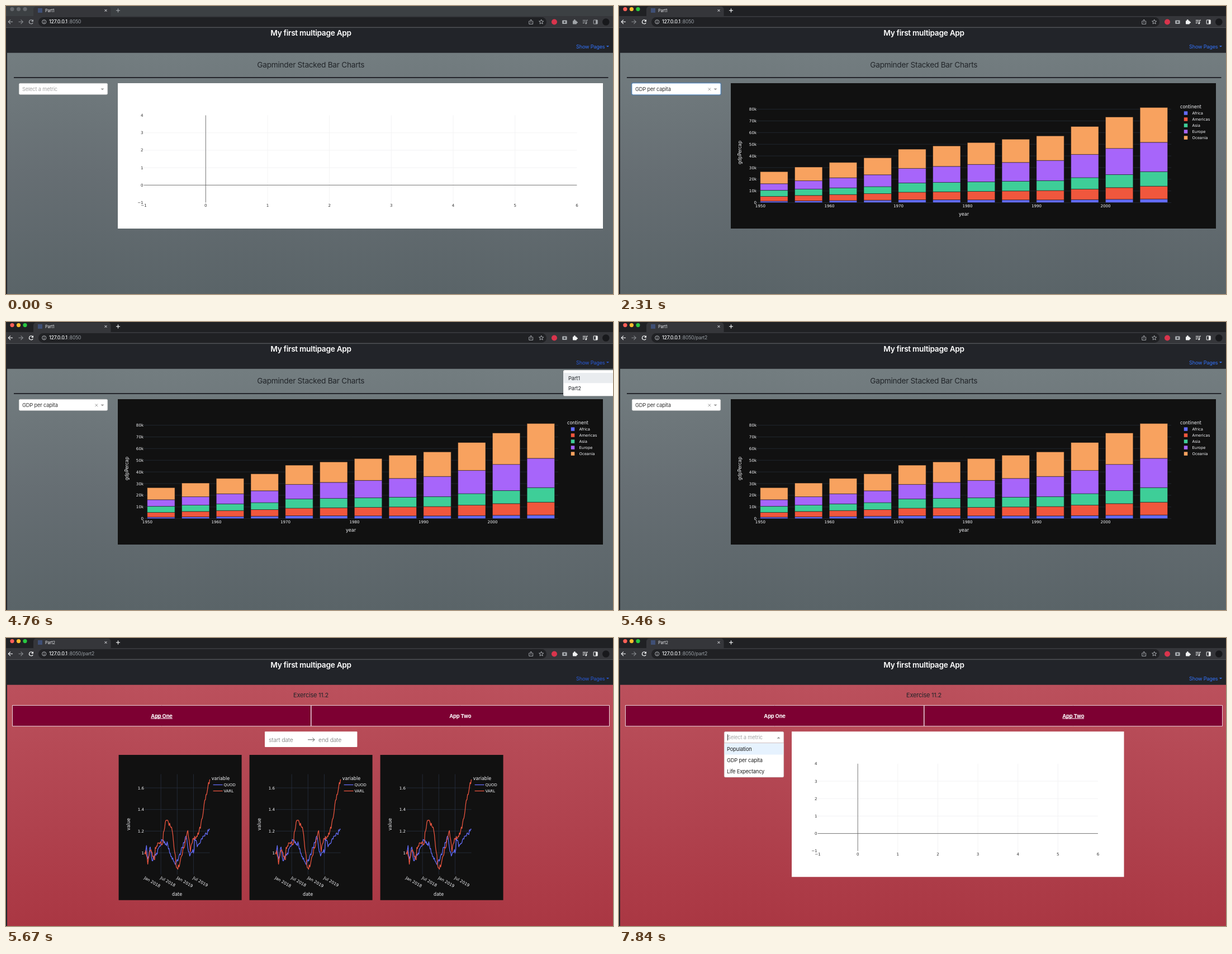
Recreate the animation shown at these times as an HTML page with a canvas. Size 1086 by 515 pixels, loop 8 s.

```html
<!DOCTYPE html>
<html lang="en">
<head>
<meta charset="utf-8">
<title>My first multipage App</title>
<style>
html, body { margin: 0; width: 100%; height: 100%; overflow: hidden; background: #222429; }
canvas { display: block; width: 1086px; height: 515px; }
</style>
</head>
<body>
<canvas id="stage"></canvas>
<script>
const W = 1086, H = 515, LOOP = 8000;
const canvas = document.getElementById('stage');
const ctx = canvas.getContext('2d');
const dpr = window.devicePixelRatio || 1;
canvas.width = W * dpr;
canvas.height = H * dpr;

const UI = 'Inter, "Liberation Sans", sans-serif';
const PLOT = '"DejaVu Sans", sans-serif';
const DARK = '#222429', INK = '#212529', PALE = '#f8f9fc';

const clamp = v => Math.max(0, Math.min(1, v));
const ramp = (t, from, to) => clamp((t - from) / (to - from));
const within = (t, a, b) => t >= a && t < b;

// Straight lines between key points
function interp(xs, ys, x) {
  let i = 1;
  while (i < xs.length - 1 && xs[i] < x) i++;
  return ys[i - 1] + (ys[i] - ys[i - 1]) * ramp(x, xs[i - 1], xs[i]);
}

function seeded(seed) {
  return () => (seed = seed * 16807 % 2147483647) / 2147483647;
}

// Weekly values: key points with a little noise between them
function walk(name, color, seed, weeks, levels) {
  const rand = seeded(seed);
  const values = Array.from({ length: 105 }, (_, k) =>
    interp(weeks, levels, k) + (weeks.includes(k) ? 0 : (rand() - 0.5) * 0.045));
  return { name, color, values };
}

const stocks = [
  walk('QUOD', '#636cf9', 77,
    [0, 3, 5, 9, 12, 18, 28, 37, 42, 50, 58, 66, 72, 79, 80, 84, 95, 104],
    [1, 1.067, 0.942, 1.053, 0.926, 0.975, 1.12, 1.075, 0.965, 0.905, 1.01, 1.154, 0.97, 1.025, 1.134, 1.055, 1.156, 1.217]),
  walk('VARL', '#ee5640', 41,
    [0, 2, 5, 9, 16, 17, 22, 29, 30, 34, 38, 43, 46, 51, 53, 60, 69, 73, 77, 86, 93, 96, 104],
    [1, 1.02, 0.894, 1.02, 0.935, 1.05, 1.09, 1.09, 1.19, 1.3, 1.28, 1.237, 1.106, 0.861, 0.847, 0.98, 1.205, 1.01, 1.13, 1.17, 1.35, 1.487, 1.678])
];

// Mean GDP per capita at key five-year steps from 1952
const gdpSteps = [0, 3, 4, 8, 11];
const gdp = [
  ['Africa', '#636cf9', [1253, 2050, 2450, 2282, 3089]],
  ['Americas', '#f0573d', [4079, 5668, 6491, 8045, 11003]],
  ['Asia', '#3ece98', [5195, 5971, 7900, 8500, 12473]],
  ['Europe', '#a765fa', [5661, 10144, 12480, 17300, 25054]],
  ['Oceania', '#f8a25f', [10298, 14495, 16418, 21000, 29810]]
];

function rect(x, y, w, h, fill, stroke, r = 0, lw = 1) {
  ctx.beginPath();
  ctx.roundRect(x, y, w, h, r);
  if (fill) { ctx.fillStyle = fill; ctx.fill(); }
  if (stroke) { ctx.strokeStyle = stroke; ctx.lineWidth = lw; ctx.stroke(); }
}

function disc(x, y, r, fill) {
  ctx.beginPath();
  ctx.arc(x, y, r, 0, 7);
  ctx.fillStyle = fill;
  ctx.fill();
}

function line(points, color, lw = 1) {
  ctx.beginPath();
  for (let i = 0; i < points.length; i += 2) ctx.lineTo(points[i], points[i + 1]);
  ctx.strokeStyle = color;
  ctx.lineWidth = lw;
  ctx.stroke();
}

function ring(x, y, r, color, lw = 1, from = 0, to = 7) {
  ctx.beginPath();
  ctx.arc(x, y, r, from, to);
  ctx.strokeStyle = color;
  ctx.lineWidth = lw;
  ctx.stroke();
}

function cross(x, y, r, color) {
  line([x - r, y - r, x + r, y + r], color);
  line([x - r, y + r, x + r, y - r], color);
}

function plus(x, y, r, color, lw) {
  line([x - r, y, x + r, y], color, lw);
  line([x, y - r, x, y + r], color, lw);
}

function tri(x, y, w, h, fill) {
  ctx.beginPath();
  ctx.moveTo(x - w / 2, y - h / 2);
  ctx.lineTo(x + w / 2, y - h / 2);
  ctx.lineTo(x, y + h / 2);
  ctx.fillStyle = fill;
  ctx.fill();
}

// y is the middle of the capitals
function text(s, x, y, size, color, align = 'left', weight = 400) {
  ctx.font = `${weight} ${size}px ${UI}`;
  ctx.letterSpacing = -0.02 * size + 'px';
  ctx.textAlign = align;
  ctx.fillStyle = color;
  ctx.fillText(s, x, y + size * 0.36);
}

function label(s, x, y, color, align = 'left', size = 7.1, angle = 0) {
  ctx.save();
  ctx.translate(x, y);
  ctx.rotate(angle);
  ctx.font = `${size}px ${PLOT}`;
  ctx.letterSpacing = '0px';
  ctx.textAlign = align;
  ctx.fillStyle = color;
  ctx.fillText(s, 0, size * 0.36);
  ctx.restore();
}

function star(x, y, color) {
  const p = [];
  for (let i = 0; i <= 10; i++) {
    const a = i * Math.PI / 5 - Math.PI / 2, r = i % 2 ? 1.9 : 4.3;
    p.push(x + r * Math.cos(a), y + r * Math.sin(a));
  }
  line(p, color, 0.9);
}

function arrow(x, y, dir, color) {
  line([x - 4 * dir, y, x + 4 * dir, y], color, 1.1);
  line([x, y - 3.7, x + 3.8 * dir, y, x, y + 3.7], color, 1.1);
}

function toolIcons(icon) {
  const soft = '#b4b7bb';
  line([937.3, 27, 935.8, 27, 935.8, 32.3, 942.6, 32.3, 942.6, 27, 941.2, 27], soft, 0.9);
  line([939.2, 30, 939.2, 24.5], soft, 0.9);
  line([937.3, 26.2, 939.2, 24.3, 941.1, 26.2], soft, 0.9);
  star(957.7, 28.5, soft);
  disc(981, 28.5, 5, '#d9344c');
  rect(995.2, 25.5, 8.4, 6.5, '#a9adb1', null, 1);
  disc(999.4, 28.8, 1.8, '#45484c');
  rect(1014, 26.2, 7, 6.3, icon, null, 1);
  disc(1017.3, 25.6, 1.6, icon);
  disc(1021.3, 29.3, 1.5, icon);
  for (let i = 0; i < 3; i++) line([1031.8, 25.5 + i * 2.5, i < 2 ? 1037.5 : 1035, 25.5 + i * 2.5], icon);
  line([1041, 25.3, 1038.8, 25.3, 1038.8, 31], icon);
  disc(1037.7, 31, 1.4, icon);
  rect(1051.2, 25, 7, 7, null, icon, 0.5);
  rect(1055, 25, 3.2, 7, icon);
  disc(1073.3, 28.5, 6.3, '#18191c');
}

function browser(t) {
  const on = t >= 980;
  const icon = on ? '#f1f3f4' : '#a0a4a8';
  rect(0, 0, W, 19, on ? '#202124' : '#3c4043');
  rect(0, 18, W, 21, '#35363a');
  rect(49, 1, 138.5, 20, '#35363a', null, [5, 5, 0, 0]);
  const lights = on ? ['#ff5f57', '#febc2e', '#28c840'] : Array(3).fill('#64676b');
  lights.forEach((c, i) => disc(11 + i * 11.5, 5.6, 3.6, c));
  rect(57, 4, 8, 8, '#3f4f75');
  text(t < 5600 ? 'Part1' : 'Part2', 70, 8, 7.4, '#e4e6e9');
  cross(178.5, 8, 2, '#dfe1e4');
  plus(200.5, 8, 3.5, icon, 1.2);

  arrow(8, 28.3, -1, icon);
  arrow(26.5, 28.3, 1, '#85888c');
  ring(45, 28.3, 3.5, icon, 1.2, 0.4, 5.6);
  ctx.beginPath();
  ctx.moveTo(49, 24); ctx.lineTo(49, 28); ctx.lineTo(45, 28);
  ctx.fillStyle = icon;
  ctx.fill();

  rect(58, 20, 909, 17, '#202124', null, 8.5);
  ring(68.2, 28.3, 3.6, '#c5c8cc', 0.9);
  line([68.2, 28, 68.2, 30.5], '#c5c8cc');
  line([68.2, 26, 68.2, 27], '#c5c8cc');
  text('127.0.0.1', 77, 28.3, 8.8, '#f1f3f4', 'left', 500);
  text(t < 5320 ? ':8050' : ':8050/part2', 111.5, 28.3, 8.6, '#9aa0a6');
  toolIcons(icon);
  rect(0, 38, W, 1.3, '#505256');
}

// Hover and focus darken the link
function linkColor(t) {
  const first = ramp(t, 3220, 3430) * (1 - ramp(t, 5250, 5390));
  const second = t < 5530 ? 0 : 1 - ramp(t, 6650, 6860);
  const k = Math.max(first, second);
  const mix = (a, b) => Math.round(a + (b - a) * k);
  return `rgb(${mix(50, 40)},${mix(113, 90)},${mix(247, 215)})`;
}

function navbar(t) {
  rect(0, 39.3, W, 45, DARK);
  text('My first multipage App', 545.5, 48.3, 13.65, '#fff', 'center', 560);
  const c = linkColor(t);
  text('Show Pages', 1020, 73, 9.15, c);
  tri(1076.5, 72.3, 5, 2.5, c);
}

function backdrop(top, mid, bottom) {
  const g = ctx.createLinearGradient(0, 84, 0, H);
  g.addColorStop(0, top);
  g.addColorStop(0.5, mid);
  g.addColorStop(1, bottom);
  rect(2, 83.8, W - 2, H - 83.8, g);
}

function dropdown(x, y, w, { value, open, hot, caret, focus, hover }) {
  if (focus) rect(x - 0.5, y - 0.5, w + 1, 21.5, null, 'rgba(0,126,255,.25)', 2.5, 1.5);
  rect(x + 0.3, y + 0.3, w - 0.6, 20, '#fff', focus ? '#8dbdf0' : '#ccc', open ? [2, 2, 0, 0] : 2, 0.6);
  text(value || 'Select a metric', x + 6, y + 10.6, 9.3, value ? '#333' : '#a5a5a5');
  const ax = x + w - 9.5, ay = y + 10.9;
  tri(ax, ay, 6, open ? -3 : 3, hover ? '#666' : '#999');
  if (value) cross(ax - 10.7, ay, 2.3, '#999');
  if (!open) return;
  if (caret) rect(x + 6, y + 5, 0.9, 11, '#222');
  rect(x + 0.3, y + 20.6, w - 0.6, 61, '#fff', '#ccc', [0, 0, 2, 2], 0.6);
  ['Population', 'GDP per capita', 'Life Expectancy'].forEach((s, i) => {
    const top = y + 20.9 + i * 20.2;
    if (i === hot) rect(x + 0.7, top, w - 1.4, 20.2, '#e6f2fe');
    text(s, x + 5, top + 10.4, 9.3, '#222');
  });
}

function emptyChart(x, y, w, h) {
  rect(x, y, w, h, '#fff');
  const left = x + 46.6, step = (w - 93.2) / 7, top = y + 57.5;
  const px = v => left + (v + 1) * step, py = v => top + (4 - v) * 31.2;
  for (let v = 1; v < 6; v++) line([px(v), top, px(v), py(-1)], '#f0f0f2', 0.8);
  for (let v = 1; v < 4; v++) line([left, py(v), px(6), py(v)], '#f0f0f2', 0.8);
  line([px(0), top, px(0), py(-1)], '#666', 0.9);
  line([left, py(0), px(6), py(0)], '#666', 0.9);
  for (let v = -1; v <= 6; v++) {
    const s = String(v).replace('-', '\u2212');
    label(s, px(v), py(-1) + 5.4, '#333', 'center');
    if (v < 5) label(s, left - 1, py(v), '#333', 'right');
  }
}

function barChart() {
  rect(200, 138, 868, 260, '#111');
  const py = v => 351.6 - v * 0.0020875;
  for (let k = 0; k <= 80; k += 10) {
    line([246.5, py(k * 1000), 988, py(k * 1000)], '#242b35', 0.8);
    label(k ? k + 'k' : '0', 246, py(k * 1000), PALE, 'right');
  }
  for (let i = 0; i < 12; i++) {
    let sum = 0;
    for (const [, color, levels] of gdp) {
      const base = py(sum);
      sum += interp(gdpSteps, levels, i);
      rect(252.7 + i * 61.77, py(sum), 49.4, base - py(sum), color, '#111', 0, 0.5);
    }
  }
  for (let i = 0; i < 6; i++) label(1950 + i * 10, 252.9 + i * 123.54, 357, PALE, 'center');
  label('year', 617, 372.5, PALE, 'center', 8.1);
  label('gdpPercap', 216.5, 262, PALE, 'center', 8, -Math.PI / 2);
  label('continent', 1004, 180.5, PALE, 'left', 8);
  gdp.forEach(([name, color], i) => {
    const y = 191.5 + i * 11;
    rect(1010.8, y - 3.2, 6.5, 6.5, color);
    label(name, 1025.5, y, PALE, 'left', 6.85);
  });
}

function modebar(alpha) {
  if (!alpha) return;
  const c = PALE, y = 148;
  const at = (i, gap) => 922 + i * 13.3 + gap * 6.5;
  const box = x => rect(x - 4, y - 4, 8, 8, null, c);
  ctx.save();
  ctx.globalAlpha = 0.3 * alpha;
  rect(at(0, 0) - 4.5, y - 3, 9, 6.5, c, null, 1);
  ring(at(1, 1) - 1, y - 1, 3, c);
  line([at(1, 1) + 1, y + 1, at(1, 1) + 4, y + 4], c, 1.4);
  plus(at(2, 1), y, 4.5, c);
  ctx.setLineDash([2, 1]);
  box(at(3, 1));
  ctx.setLineDash([]);
  ring(at(4, 1), y, 3.8, c, 1, -2, 3);
  box(at(5, 2));
  plus(at(5, 2), y, 2, c);
  box(at(6, 2));
  line([at(6, 2) - 2, y, at(6, 2) + 2, y], c);
  cross(at(7, 2), y, 4, c);
  tri(at(8, 2), y - 2, 10, -5, c);
  rect(at(8, 2) - 3, y, 6, 4.5, c);
  rect(at(9, 3) - 4.5, y - 4.5, 9, 9, c);
  ctx.restore();
}

function stockChart(x) {
  rect(x, 209, 220, 259.7, '#111');
  const left = x + 46.4, py = v => 384 - (v - 1) * 193.3;
  ['Jan 2018', 'Jul 2018', 'Jan 2019', 'Jul 2019'].forEach((s, i) => {
    const tx = left + i * 29.15;
    if (i) line([tx, 243.5, tx, 423], '#283040', 0.8);
    label(s, tx - 0.3, 428, PALE, 'left', 7.3, Math.PI / 6);
  });
  for (const v of [1, 1.2, 1.4, 1.6]) {
    line([left, py(v), left + 116.6, py(v)], '#283040', 0.8);
    label(v, left - 1, py(v), PALE, 'right');
  }
  stocks.forEach(({ name, color, values }, i) => {
    ctx.lineJoin = 'round';
    line(values.flatMap((v, k) => [left + k * 1.121, py(v)]), color, 1.25);
    ctx.lineJoin = 'miter';
    const y = 262.5 + i * 11;
    line([x + 169, y, x + 186, y], color, 1.25);
    label(name, x + 188, y, PALE, 'left', 6.85);
  });
  label('variable', x + 166.2, 251.5, PALE, 'left', 8);
  label('value', x + 17.5, 333, PALE, 'center', 8, -Math.PI / 2);
  label('date', x + 104.5, 458.5, PALE, 'center', 8);
}

function pageMenu(t) {
  rect(997, 86, 95, 46.5, '#fff', 'rgba(0,0,0,.2)', 2.5, 0.6);
  const active = t >= 5320;
  const hot = within(t, 4340, 4760) || t >= 5040 ? 1 : 0;
  if (t >= 4270) rect(997, 91 + hot * 18.3, 89, 18.2, active ? '#2f6df6' : '#e9ecef');
  text('Part1', 1006, 100.2, 9.4, INK);
  text('Part2', 1006, 118.5, 9.4, active ? '#fff' : INK);
}

function pageOne(t) {
  backdrop('#737d80', '#666e73', '#5a6468');
  text('Gapminder Stacked Bar Charts', 545.3, 105, 13.7, INK, 'center');
  rect(14, 127, 1063.5, 1.9, '#25272d');
  if (t < 2310) emptyChart(200, 138, 868, 260);
  else {
    barChart();
    modebar(ramp(t, 2380, 2590) * (1 - ramp(t, 2760, 3010)));
  }
  dropdown(23, 138, 159, {
    value: t < 2100 ? '' : 'GDP per capita',
    open: within(t, 1400, 2100),
    hot: t < 1680 ? 0 : 1,
    caret: t < 1960,
    focus: within(t, 2100, 3570),
    hover: within(t, 1120, 1260)
  });
  if (within(t, 3710, 5390)) pageMenu(t);
}

function tab(s, x, w, on) {
  rect(x, 120.5, w, 37.2, '#7d0032', '#f3e6ea', 0, 0.9);
  const mid = x + w / 2;
  text(s, mid, 139.5, 9.4, '#fff', 'center', 700);
  if (on) rect(mid - 19.3, 143.6, 38.6, 0.9, '#fff');
}

function datePicker() {
  rect(463, 167.3, 165.4, 27.8, '#fff', null, 1);
  text('start date', 470, 182, 10.5, '#757575', 'left', 300);
  text('end date', 559, 182, 10.5, '#757575', 'left', 300);
  line([540, 181.8, 552, 181.8], '#484848', 0.9);
  line([548.5, 178.3, 552, 181.8, 548.5, 185.3], '#484848', 0.9);
}

function pageTwo(t) {
  backdrop('#bb505c', '#b14450', '#aa3743');
  text('Exercise 11.2', 545.5, 102.5, 11, INK, 'center');
  const second = t >= 6720;
  tab('App One', 11.5, 534, !second);
  tab('App Two', 546, 533.5, second);
  if (within(t, 5670, 6930)) {
    datePicker();
    for (let i = 0; i < 3; i++) stockChart(201.6 + i * 234);
  }
  if (t >= 6930) {
    emptyChart(309, 167.3, 594.5, 260);
    dropdown(188, 167.3, 107, { open: t >= 7840, hot: 0, caret: true, focus: within(t, 7770, 7840) });
  }
}

function draw() {
  const t = performance.now() % LOOP;
  ctx.setTransform(dpr, 0, 0, dpr, 0, 0);
  rect(0, 0, W, H, DARK);
  browser(t);
  navbar(t);
  if (t < 5530) pageOne(t);
  else pageTwo(t);
  requestAnimationFrame(draw);
}
draw();
</script>
</body>
</html>
```
